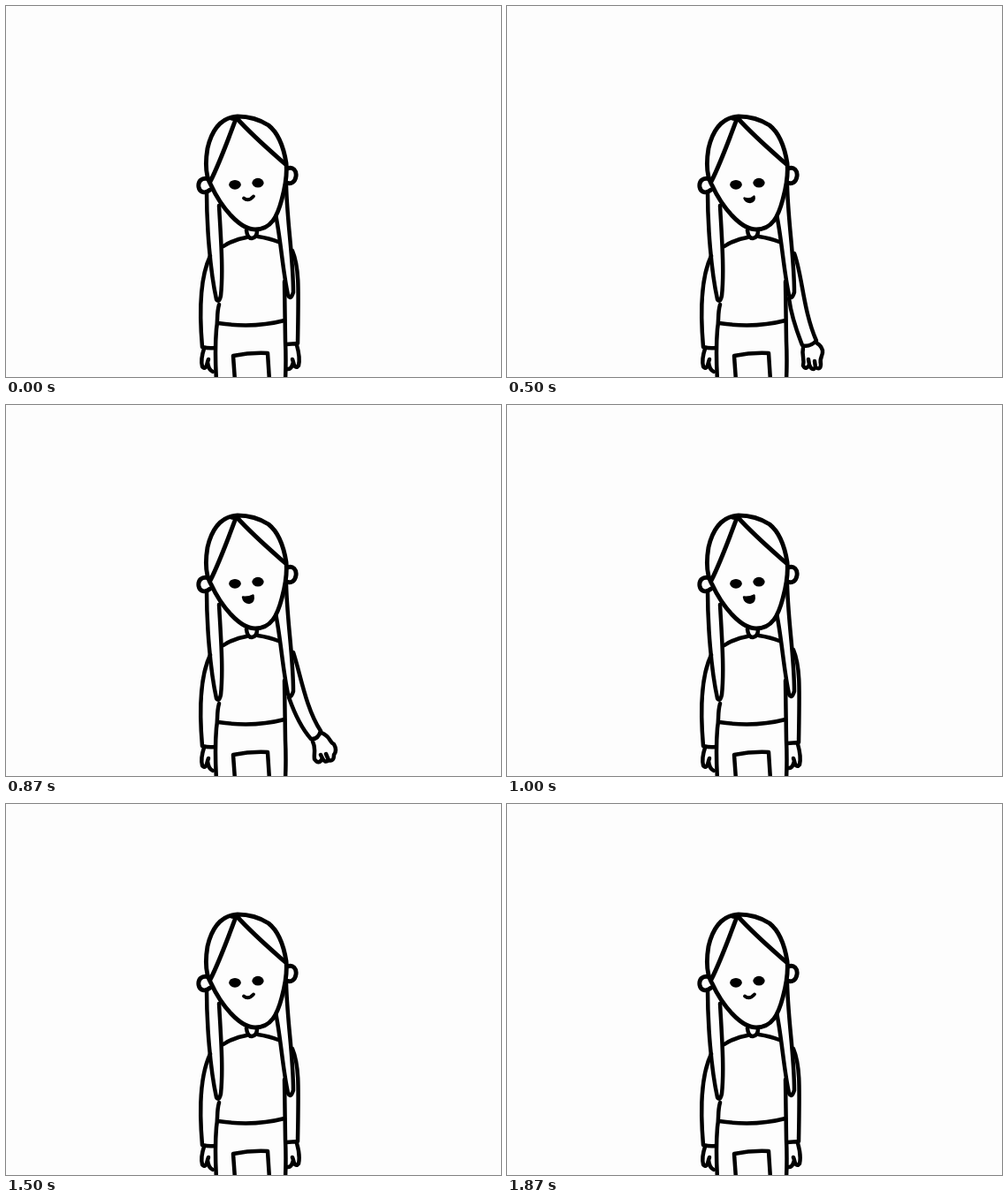
An HTML page for the animation above (2 s loop, 560 by 420 pixels).

```html
<!DOCTYPE html>
<html lang="en">
<head>
<meta charset="utf-8">
<title>Wave and nod</title>
<style>
  html, body { margin: 0; width: 100%; height: 100%; overflow: hidden; background: #fdfdfd; }
  svg { display: block; width: 100vw; height: 100vh; }
  path { fill: none; stroke: #000; stroke-width: 4.5; stroke-linecap: round; stroke-linejoin: round; }
  .skin { fill: #fdfdfd; }
  .head path { stroke-width: 4.9; }
  .head .mouth { stroke-width: 3.8; }
  .head .open { fill: #000; stroke-width: 2.4; }
</style>
</head>
<body>
<svg viewBox="0 0 560 420">
  <!-- body -->
  <path d="M246 272Q258 264 272 262M285 261Q298 263 308 267"/>
  <path d="M241 338C238 349 240 355 238 366Q236 390 238 424M315 312L316 380Q317 400 316 424"/>
  <path d="M240 359Q280 365 315 356M259 424L257 396Q277 392 296 393L298 424"/>
  <path d="M231 283C221 304 218 340 222 386Q230 388 236 387"/>
  <path d="M224 388Q220 400 222 408Q226 413 228 403Q229 412 234 414M228 403L229 400"/>
  <path d="M272 254Q273 263 278 263Q284 262 284 255"/>
  <path id="arm"/>
  <path id="hair"/>

  <g class="head" id="head">
    <path class="skin" d="M230 196C221 193 217 199 218 205C219 211 225 213 231 208M318 184C325 181 329 187 328 193C327 200 321 203 316 199"/>
    <path class="skin" d="M262 125C244 126 233 140 228 161C225 179 226 193 232 203C243 227 264 253 282 253C300 253 307 238 312 219C317 201 318 188 317 178C314 159 307 143 297 135C286 128 272 125 262 125Z"/>
    <path d="M255 127L260 128C251 152 242 177 231 199M261 127C280 148 299 164 316 179"/>
    <ellipse cx="259" cy="202.300" rx="6.800" ry="5.400"/>
    <ellipse cx="285" cy="200.200" rx="6.600" ry="5.400"/>
    <path class="mouth" id="mouth"/>
  </g>
</svg>
<script>
const LOOP = 2000;

const arms = {
  down: "M324 277C332 296 331 320 330 382L317 383M329 384Q333 398 331 407Q327 412 325 403Q323 412 318 411M325 403L324 400",
  low: "M325 280C334 304 335 345 350 379Q342 387 334 384C329 371 322 354 319 331" +
       "M335 387C333 396 337 400 335 407Q338 413 342 406Q345 414 349 409Q355 413 355 405C353 399 358 395 357 390Q355 384 351 382M342 406L341 400M349 409L348 402",
  high: "M325 280C333 304 339 343 356 369Q353 379 345 378C337 369 327 351 320 331" +
        "M347 381C351 389 348 394 349 401Q354 408 358 400Q361 406 365 402Q371 404 371 396Q375 391 371 384C365 381 368 376 357 371M358 400L356 396M365 402L362 395"
};

const mouths = {
  smile: "M269 217.500Q274 222 280 215.500",
  half: "M268.500 217.500Q275 220 279.500 215.500Q281 221 275 222Q270 221.500 268.500 217.500Z",
  open: "M268 217.500Q275 218 279.500 215.500Q281 223 275 224Q269 223.500 268 217.500Z"
};

const hairs = {
  straight: "M227 209C227 250 231 300 238 332Q241 337 243 328C246 300 243 262 241 226M317 203C318 245 325 285 325 324Q322 334 319 327C313 300 311 265 305 236",
  tilted: "M224 207C229 246 231 300 238 332Q241 337 243 328C246 300 243 262 241 233M310 198C320 242 325 285 325 324Q322 334 319 327C313 300 311 265 303 234"
};

// start ms, arm, mouth, head tilt
const steps = [
  [0, "down", "smile", 0],
  [250, "down", "half", 0],
  [370, "down", "open", 0],
  [500, "low", "half", 0],
  [750, "high", "half", 0],
  [870, "high", "open", 0],
  [1000, "down", "open", 0],
  [1250, "down", "open", -7],
  [1500, "down", "smile", 0],
  [1750, "down", "half", 0],
  [1870, "down", "smile", 0]
];

const el = id => document.getElementById(id);
const [arm, hair, head, mouth] = ["arm", "hair", "head", "mouth"].map(el);
let shown;

function pose(step) {
  const [, armKey, mouthKey, tilt] = step;
  arm.setAttribute("d", arms[armKey]);
  mouth.setAttribute("d", mouths[mouthKey]);
  mouth.classList.toggle("open", mouthKey !== "smile");
  hair.setAttribute("d", tilt ? hairs.tilted : hairs.straight);
  head.setAttribute("transform", `rotate(${tilt} 278 253)`);
}

function draw() {
  const t = performance.now() % LOOP;
  const step = steps.findLast(s => s[0] <= t);
  if (step !== shown) pose(shown = step);
  requestAnimationFrame(draw);
}
draw();
</script>
</body>
</html>
```
